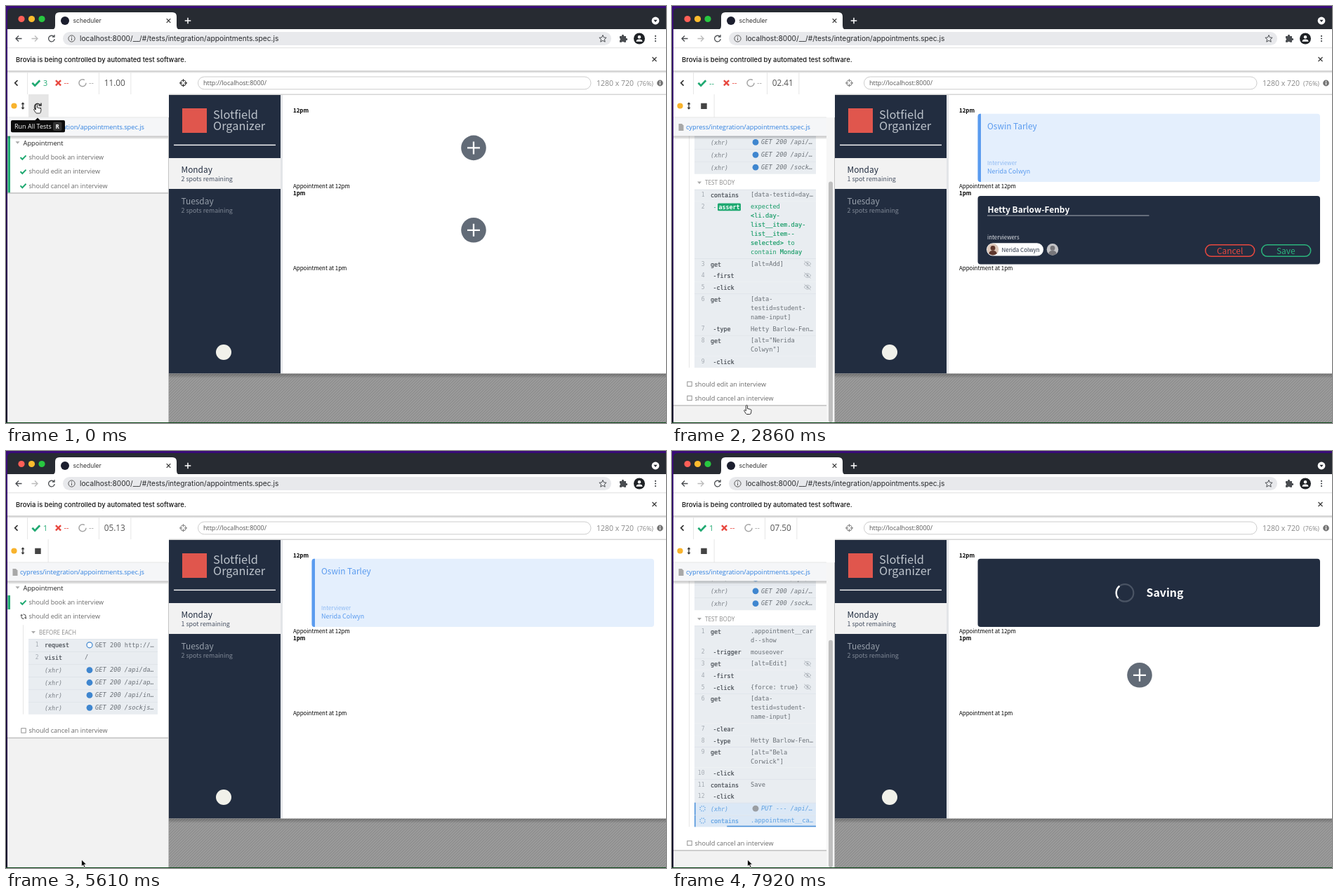
Write an HTML page that moves like this. It is 940 px wide and 595 px high and loops after 8 s.

```html
<!DOCTYPE html>
<html lang="en">
<head>
<meta charset="utf-8">
<title>scheduler</title>
<style>
html, body { margin: 0; width: 100%; height: 100%; overflow: hidden; background: #fff; }
svg { display: block; position: absolute; left: 0; top: 0; }
text { white-space: pre; }
.ui { font-family: "Open Sans", "Noto Sans", sans-serif; }
.sys { font-family: Inter, Roboto, sans-serif; }
.mono { font-family: "DejaVu Sans Mono", "Liberation Mono", monospace; }
.app { font-family: "Noto Sans CJK JP", "Noto Sans CJK SC", "Open Sans", sans-serif; }
</style>
</head>
<body>
<svg id="stage" width="940" height="595" viewBox="0 0 940 595"></svg>
<script>
const LOOP = 8000, STEP = 110;
const RESET = 440, SECOND = 4620;
const NAVY = '#222d40', BLUE = '#4a90d9', GREEN = '#1fa971', RED = '#e8483f';
const STUDENT = 'Oswin Tarley', NEWCOMER = 'Hetty Barlow-Fenby';
const MENTORS = ['Nerida Colwyn', 'Bela Corwick'];

// ---- drawing helpers
const esc = s => s.replace(/&/g, '&amp;').replace(/</g, '&lt;');
const text = (x, y, s, size, fill, cls = 'ui', more = '') =>
  `<text class="${cls}" x="${x}" y="${y}" font-size="${size}" fill="${fill}" ${more}>${esc(s)}</text>`;
const rect = (x, y, x2, y2, fill, more = '') =>
  `<rect x="${x}" y="${y}" width="${x2 - x}" height="${y2 - y}" fill="${fill}" ${more}/>`;
const disc = (x, y, r, fill, more = '') => `<circle cx="${x}" cy="${y}" r="${r}" fill="${fill}" ${more}/>`;
const line = (d, stroke, w = 1, more = '') =>
  `<path d="${d}" fill="none" stroke="${stroke}" stroke-width="${w}" ${more}/>`;
const shape = (d, fill, more = '') => `<path d="${d}" fill="${fill}" ${more}/>`;
const cross = (x, y, r, c, w) => line(`M${x - r} ${y - r}l${2 * r} ${2 * r}m0 ${-2 * r}l${-2 * r} ${2 * r}`, c, w);
const plus = (x, y, r, c, w) => line(`M${x - r} ${y}h${2 * r}M${x} ${y - r}v${2 * r}`, c, w);
const tick = (x, y, k, c) => line(`M${x - 4 * k} ${y}l${2.8 * k} ${2.8 * k}l${5.2 * k} ${-5.4 * k}`, c, 2 * k);
const spin = (x, y, a, body) => `<g transform="translate(${x} ${y}) rotate(${a})">${body}</g>`;
const dots = (x, y, r, c, t) => spin(x, y, t * .36,
  disc(0, 0, r, 'none', `stroke="${c}" stroke-width="1.5" pathLength="16" stroke-dasharray=".8 1.2"`));
const caret = (x, y) => shape(`M${x - 3} ${y - 1.8}h6l-3 3.6z`, '#aaa');

const defs = `<defs>
<linearGradient id="sky" x2="0" y2="1"><stop stop-color="#390b78"/><stop offset=".5" stop-color="#2b0a55"/><stop offset="1" stop-color="#130a28"/></linearGradient>
<linearGradient id="fade" x2="0" y2="1"><stop stop-color="#000" stop-opacity=".25"/><stop offset="1" stop-color="#000" stop-opacity="0"/></linearGradient>
<pattern id="hatch" width="4" height="4" patternUnits="userSpaceOnUse"><rect width="4" height="4" fill="#9a9a9a"/><path d="M-1 1L1-1M0 4L4 0M3 5L5 3" stroke="#888" stroke-width="1"/></pattern>
</defs>`;

// ---- browser window
function browser() {
  const ink = '#4a4d51';
  let s = shape('M2 34V9q0-6 6-6H940V34z', '#272b32');
  s += ['#ff5f57', '#febc2e', '#28c840'].map((c, i) => disc(22 + i * 14.5, 18.5, 4.6, c)).join('');
  s += shape('M64 34q6 0 6-6V15q0-6 6-6H237q6 0 6 6V28q0 6 6 6z', '#fff');
  s += disc(84, 21, 6, '#1b1e2e') + text(95.5, 24.2, 'scheduler', 8.6, '#333', 'sys');
  s += cross(231.5, 21, 2.8, '#333', 1.2) + plus(259, 21, 4.3, '#fff', 1.5);
  s += disc(925, 21, 5.4, '#fff') + shape('M922.4 19.8h5.2l-2.6 3.2z', '#272b32');
  s += rect(2, 33, 940, 94, '#fff');
  s += line('M22.5 46.5h-8.5m4-4l-4 4l4 4', ink, 1.3) + line('M36.5 46.5h8.5m-4-4l4 4l-4 4', '#bbb', 1.3);
  s += line('M68 43.5a4.3 4.3 0 1 0 1.2 3.6M69 41v3.2h-3.2', ink, 1.3);
  s += rect(81, 37, 862, 56, '#e8e9ec', 'rx="9.5"');
  s += disc(93.5, 46.5, 4.6, 'none', 'stroke="#555" stroke-width="1"') + line('M93.5 45.8v3.2M93.5 43.6v1.2', '#555', 1);
  s += text(105, 50, 'localhost:8000/__/#/tests/integration/appointments.spec.js', 10.2, '#26282b', 'sys');
  s += shape('M850 41.5l1.5 3.4l3.6.3l-2.7 2.4l.8 3.6l-3.2-1.9l-3.2 1.9l.8-3.6l-2.7-2.4l3.6-.3z', 'none', `stroke="${ink}" stroke-width="1"`);
  s += shape('M874 43h3a1.6 1.6 0 1 1 3 0h3v3a1.6 1.6 0 1 1 0 3v2.8h-3a1.6 1.6 0 0 0-3 0h-3v-2.8a1.6 1.6 0 0 0 0-3z', ink);
  s += disc(902, 46.5, 8, '#1f2226') + disc(902, 44.3, 2.2, '#fff') + shape('M897.5 50.8q0-3.4 4.5-3.4t4.5 3.4z', '#fff');
  s += [-3.6, 0, 3.6].map(d => disc(925, 46.5 + d, 1.1, ink)).join('');
  s += rect(2, 59.3, 940, 60.2, '#dcdcdc');
  s += text(14, 79.6, 'Brovia is being controlled by automated test software.', 9.45, '#111', 'sys', 'font-weight="500"');
  return s + cross(923.5, 76, 3, '#333', 1.1);
}

// ---- command log data: n = name, m = message lines, nm = lines in the narrow panel
const hook = at => [
  { n: 'request', m: ['GET 200 http://localhost:8000/'], dot: 'ring' }, { n: 'visit', m: ['/'] },
  ...['/api/days', '/api/appointments', '/api/interviewers', '/sockjs-node'].map(p => ({ n: '(xhr)', m: ['GET 200 ' + p], dot: 'full', it: 1 }))
].map(r => ({ ...r, at, tall: 1 }));
const cmd = (at, n, m = '', opt = {}) => ({ at, n, m: m.split('|'), ...opt });
const finish = (at, done) => [
  cmd(at, '(xhr)', 'PUT --- /api/appointments/2', { dot: 'wait', it: 1, tall: 1, done }),
  cmd(at, 'contains', '.appointment__card--show', { done, bar: at })];
const INPUT = '[data-|testid=student-|name-input]';

const tests = [
  { name: 'should book an interview', from: RESET, to: SECOND, hook: hook(1430), body: [
    cmd(1650, 'contains', '[data-testid=day], Monday'),
    cmd(1650, '-assert', 'expected *<li.day-*|*list__item.day-*|*list__item--*|*selected>* to|contain *Monday*',
      { ok: 1, nm: 'expected|*<li.day-*|*list__item.day-*|*list__item--*|*selected>* to|contain *Monday*'.split('|') }),
    cmd(1760, 'get', '[alt=Add]', { eye: 1 }), cmd(1760, '-first', '', { eye: 1 }),
    cmd(1870, '-click', '', { eye: 2, done: 2050, bar: 1870 }),
    cmd(2090, 'get', INPUT), cmd(2150, '-type', NEWCOMER, { done: 2700, bar: 2150 }),
    cmd(2750, 'get', `[alt="${MENTORS[0].replace(' ', '|')}"]`), cmd(2750, '-click', '', { done: 2860, bar: 2750 }),
    cmd(2970, 'contains', 'Save'), cmd(2970, '-click', '', { done: 3080, bar: 2970 }),
    ...finish(3075, 4510)] },
  { name: 'should edit an interview', from: SECOND, to: LOOP, hook: hook(5500), body: [
    cmd(5720, 'get', '.appointment__card-|-show', { nm: ['.appointment__car', 'd--show'] }),
    cmd(5830, '-trigger', 'mouseover', { done: 6050, bar: 5900 }),
    cmd(5940, 'get', '[alt=Edit]', { eye: 1, done: 6050, bar: 5940 }),
    cmd(5940, '-first', '', { eye: 1, done: 6050, bar: 5940 }),
    cmd(5940, '-click', '{force: true}', { eye: 2, done: 6050, bar: 5940 }),
    cmd(6050, 'get', INPUT), cmd(6160, '-clear'), cmd(6160, '-type', NEWCOMER, { done: 6550, bar: 6160 }),
    cmd(6600, 'get', `[alt="${MENTORS[1].replace(' ', '|')}"]`), cmd(6600, '-click', '', { done: 6710, bar: 6600 }),
    cmd(6710, 'contains', 'Save'), cmd(6710, '-click', '', { done: 6820, bar: 6710 }),
    ...finish(6850, LOOP)] },
  { name: 'should cancel an interview', from: LOOP, to: LOOP }
];

const rowHeight = (r, narrow) => r.tall ? 17.9 : 13 * ((narrow && r.nm) || r.m).length + 3.7;
const medium = c => `stroke="${c}" stroke-width=".2"`;
const rich = (s, c) => s.split('*').map((p, i) => i % 2 ? `<tspan ${medium(c)}>${esc(p)}</tspan>` : esc(p)).join('');

function row(r, num, y, narrow, t) {
  const right = narrow ? 205 : 216, h = rowHeight(r, narrow), cy = y + (r.tall ? 9 : 8.4), base = cy + 3;
  const wait = t < (r.done || 0), child = r.n[0] === '-';
  const ink = wait ? '#5b9fe2' : r.ok ? '#1a9d69' : '#6a7077';
  let s = rect(32, y, right, y + h + .1, wait ? '#dbe8f6' : '#e9edf1');
  if (!child) s += rect(32, y, right, y + .8, '#dde2e8');
  if (wait) {
    s += rect(32, y, 33.5, y + h, BLUE) + dots(43.5, cy - .5, 3.6, '#5b9fe2', t);
    if (r.bar) s += rect(32 + (right - 32) * Math.max(0, t - r.bar) / 4000, y + h - 1.6, right, y + h, BLUE);
  } else if (num) s += text(46.5, base - 1, num, 8, '#a5abb2', 'mono', 'text-anchor="end"');
  const slant = r.it ? 'font-style="italic"' : '';
  const nameInk = wait ? '#5b9fe2' : r.it ? '#777d84' : '#434950';
  if (r.ok) {
    s += text(58.5, base, '-', 8.3, GREEN, 'mono') + rect(65, cy - 5.3, 98, cy + 5.3, GREEN, 'rx="1.5"');
    s += text(66.5, base - .2, 'assert', 8.3, '#fff', 'mono', 'font-weight="700"');
  } else s += text(child ? 58.5 : 55, base, r.n, 8.3, nameInk, 'mono', r.it ? slant : medium(nameInk));
  if (r.dot === 'ring') s += disc(119, cy - .5, 4, '#fff', 'stroke="#3f86cf" stroke-width="1.2"');
  else if (r.dot) s += disc(119, cy - .5, 4.4, wait ? '#9a9ea3' : '#3f86cf');
  const max = (narrow ? 17 : 19) - (r.dot ? 3 : 0);
  ((narrow && r.nm) || r.m).forEach((m, i) => {
    const cut = !m.includes('*') && m.length > max ? m.slice(0, max - 1) + '…' : m;
    s += text(r.dot ? 127 : 112, base - .8 + i * 13, '', 8.7, ink, 'mono', slant).replace('</text>', rich(cut, ink) + '</text>');
  });
  if (r.eye && (r.eye > 1 || !wait)) {
    const x = right - 12, e = cy - .8;
    s += line(`M${x - 5} ${e}q5-6 10 0q-5 6-10 0M${x - 4.5} ${e - 4}l9 8`, '#a9afb6', .8) + disc(x, e, 1.4, '#a9afb6');
  }
  return s;
}

// Lays the log out from y; returns its markup and its lower edge.
function log(narrow, y, t) {
  const done = t < RESET, top = y;
  let s = caret(16.5, y + 9.5) + text(24.5, y + 13, 'Appointment', 9.3, '#222');
  y += 30.5;
  for (const k of tests) {
    const passed = done || t >= k.to, live = !passed && t >= k.from;
    if (passed) s += tick(24.5, y, 1, GREEN) + (done ? '' : rect(2.5, y - 10, 6, y + 10, GREEN));
    else if (live) s += spin(25, y, t * .3, line('M-3-.9a3.2 3.2 0 0 1 5.7-.9M3 .9a3.2 3.2 0 0 1-5.7.9', '#555', 1.1) + shape('M4-3.600v3h-3zM-4 3.600v-3h3z', '#555'));
    else s += rect(21.8, y - 3.2, 28.2, y + 3.2, '#fff', 'stroke="#888" stroke-width=".9"');
    s += text(32.5, y + 3.2, k.name, 9.1, '#6a6a6a');
    if (live && t >= k.hook[0].at) {
      const from = y + 12;
      y += 22.5;
      for (const [title, rows] of [['BEFORE EACH', k.hook], ['TEST BODY', k.body]]) {
        const seen = rows.filter(r => t >= r.at);
        if (!seen.length) continue;
        s += caret(39, y) + text(47, y + 3, title, 8.2, '#8b8b8b');
        y += 9.6;
        let num = 0;
        for (const r of seen) {
          s += row(r, r.it ? '' : String(++num), y, narrow, t);
          y += rowHeight(r, narrow);
        }
        y += 12.6;
      }
      y -= 12.6;
      s += rect(24, from, 24.7, y, '#dcdcdc');
      y += 23.2;
    } else y += 20.2;
  }
  const end = y - 9.7;
  if (done) s += rect(2.5, top, 6, end, GREEN);
  return { s, end };
}

function panel(t) {
  const top = 185.5, limit = 570;
  const narrow = log(false, top, t).end > limit;
  let l = log(narrow, top, t);
  const scroll = Math.max(0, l.end - limit);
  if (scroll) l = log(narrow, top - scroll, t);
  const right = narrow ? 220 : 231;
  let s = rect(2, 126, 232, 594, '#f2f2f2') + rect(2, 159, right, l.end, '#fff') + l.s;
  s += rect(2, l.end - .7, right, l.end + .7, '#bdbdbd');
  if (narrow) {
    s += rect(220, 159, 231, 594, '#f6f6f6');
    s += rect(223, 595 - 436 * 436 / (436 + scroll), 229, 594, '#bfbfbf', 'rx="3"');
  }
  s += rect(231, 159, 232, 594, '#c4c4c4');
  s += rect(2, 94, 232, 159, '#fff') + rect(2, 159, right, top, '#f5f6f8') + rect(2, 158.5, right, 159.3, '#e2e2e2');
  s += rect(2, top, right, top + 5, 'url(#fade)');
  s += shape('M9.5 168h4.5l2.5 2.5v7.5h-7z', '#a8a8a8');
  s += text(20, 175.8, 'cypress/integration/appointments.spec.js', 9.2, '#2f80e0');
  return { s, hand: l.end > 569 };
}

// ---- runner header
const marks = [[440, 0], [1210, .73], [1870, 1.4], [3740, 3.3], [4730, 4.3], [5940, 5.44], [7920, 7.5]];
function clock(t) {
  if (t < RESET) return '11.00';
  const next = marks.findIndex(m => t < m[0]), i = next < 0 ? marks.length - 1 : next;
  const [a, u] = marks[i - 1], [b, v] = marks[i];
  return (u + (v - u) * (t - a) / (b - a)).toFixed(2).padStart(5, '0');
}

function header(t, loading) {
  const idle = t < RESET, count = idle ? '3' : t >= SECOND ? '1' : '--', d = count === '--' ? 3 : 0;
  const rule = (x, y, y2) => rect(x, y, x + .8, y2, '#e0e0e0');
  let s = rect(2, 93, 940, 126, '#fff') + rect(2, 92.3, 940, 96, 'url(#fade)') + rect(232, 125.5, 940, 127, '#d5d5d5');
  s += line('M16.5 106l-3.8 3.8l3.8 3.8', '#333', 1.7) + tick(42.8, 109.8, 1.35, GREEN);
  s += text(53, 113.6, count, 10.8, GREEN) + cross(74.5 + d, 109.8, 3.6, RED, 2.4) + text(82.5 + d, 113.4, '--', 10.8, RED);
  s += disc(109 + d, 109.8, 5, 'none', 'stroke="#a5a5a5" stroke-width="1.5" stroke-dasharray="26 5.4"') + text(118 + d, 113.4, '--', 10.8, '#a5a5a5');
  s += text(139.7 + d, 114, clock(t), 11.8, '#555');
  s += rule(30, 95, 126) + rule(132 + d, 95, 126) + rule(177.5 + d, 95, 126);
  const c = idle ? '#333' : '#888';
  s += disc(252.5, 109.8, 3.8, 'none', `stroke="${c}" stroke-width="1.2"`) + line('M247 109.8h4m3 0h4M252.5 104.3v4m0 3v4', c, 1.2);
  s += rect(273.5, 101, loading ? 837 : 833, 118.8, '#fff', 'rx="8.9" stroke="#cdcdcd" stroke-width="1"');
  if (loading) {
    s += shape('M778.5 101H828a8.9 8.9 0 0 1 0 17.8H778.5z', '#eee', 'stroke="#cdcdcd" stroke-width="1"');
    s += text(782, 113, '...loading', 8.3, '#666') + dots(826, 109.8, 4.3, '#555', t);
  }
  s += text(281, 113, 'http://localhost:8000/', 8.96, '#555');
  s += text(841, 113.6, '1280 x 720', 10.5, '#888') + text(899, 113.5, '(76%)', 9, '#888');
  s += disc(931.5, 110, 4.4, '#777') + line('M931.5 109.3v3.2M931.5 107v1.4', '#fff', 1.2);
  s += disc(11.5, 142.5, 4.1, '#f8b32d') + line('M24 138.5v8', '#333', 1.3) + shape('M21.5 140.3l2.5-3.1l2.5 3.1zM21.5 144.7l2.5 3.1l2.5-3.1z', '#333');
  if (idle) s += rect(32, 126, 60, 159, '#e6e6e6') + line('M49 141.5a4.6 4.6 0 1 0 .6 3.5M50 138.5v3.6h-3.6', '#333', 1.5);
  else s += rect(41.2, 138.7, 49.7, 147, '#444');
  s += rule(59.7, 126, 159);
  if (idle) {
    s += shape('M41 163.5l4-4l4 4z', '#0c0c0c') + rect(7, 163, 84, 180.3, '#0c0c0c', 'rx="2"');
    s += text(12, 174.8, 'Run All Tests', 9, '#fff') + rect(67, 165.5, 79.5, 178, '#333', 'rx="2"');
    s += text(70.5, 174.9, 'R', 8, '#fff', 'ui', 'font-weight="700"');
  }
  return s;
}

// ---- application under test
const app = (x, y, s, size, fill, weight = 400) => text(x, y, s, size, fill, 'app', `font-weight="${weight}"`);
const box = (y, fill) => rect(435.5, y, 923, y + 97.3, fill, 'rx="4"');
const addButton = y => disc(666, y + 48.7, 17.8, '#626b77') + plus(666, y + 48.7, 9, '#fff', 2.3);

function card(y, who, mentor) {
  return box(y, '#e4effd') + shape(`M440 ${y}v97.3h-1q-3.500 0-3.500-4V${y + 4}q0-4 3.500-4z`, '#5a9bef')
    + app(449, y + 22.5, who, 11.9, '#5a9bef') + app(449, y + 73.5, 'Interviewer', 7.9, '#8db9f3') + app(449, y + 84.9, mentor, 9, '#5a9bef');
}

function saving(y, age) {
  return box(y, NAVY) + disc(645, y + 48.7, 12.3, 'none', 'stroke="#4a5464" stroke-width="2.2"')
    + spin(645, y + 48.7, 135 + age / 1100 * 360, line('M12.3 0A12.3 12.3 0 0 1 0 12.3', '#fff', 2.4))
    + app(675.5, y + 54.5, 'Saving', 15.9, '#fff', 600);
}

function avatar(x, y, i) {
  const [bg, fg] = [['#dcc6b8', '#5f382e'], ['#c3c3c6', '#77767a']][i];
  return disc(x, y, 8.3, bg) + disc(x, y - 2, 3.4, fg) + shape(`M${x - 5.8} ${y + 5.9}q.8-4.4 5.8-4.4t5.8 4.4q-5.8 4.4-11.6 0z`, fg);
}

function form(y, who, pick) {
  let s = box(y, NAVY) + app(449.5, y + 23.5, who, 11.9, '#fff', 600) + rect(449, y + 27.4, 679.5, y + 28.4, '#a8adb6');
  s += app(449, y + 61.4, 'interviewers', 7.9, '#dfe2e7');
  let x = 448;
  MENTORS.forEach((m, i) => {
    if (i === pick) s += rect(x, y + 67.2, x + 81, y + 85.5, '#fff', 'rx="9.1"') + app(x + 21.5, y + 79.4, m, 7.95, NAVY);
    s += avatar(x + (i && pick === 0 ? 10 : 9), y + 76.3, i);
    x += i === pick ? 84 : 22;
  });
  const button = (x, tx, label, c) => rect(x, y + 69.7, x + 70, y + 86.2, 'none', `rx="8.2" stroke="${c}" stroke-width="1.5"`) + app(tx, y + 82.4, label, 11.9, c);
  return s + button(759.7, 776, 'Cancel', RED) + button(839.7, 861, 'Save', '#2bb47c');
}

const typed = (t, from, to) => NEWCOMER.slice(0, Math.max(0, Math.round((t - from) / (to - from) * NEWCOMER.length)));

function slots(t) {
  const A = 153.7, B = 271.1, old = () => card(A, STUDENT, MENTORS[0]);
  if (t < RESET) return addButton(A) + addButton(B);
  if (t < 1980) return old();
  if (t < 3040) return old() + form(B, typed(t, 2150, 2700), t < 2800 ? -1 : 0);
  if (t < 4510) return old() + saving(B, t - 3040);
  if (t < SECOND) return old() + card(B, NEWCOMER, MENTORS[0]);
  if (t < 5900) return old();
  const add = t >= 6160 ? addButton(B) : '';
  if (t < 6800) return add + form(A, t < 6160 ? STUDENT : typed(t, 6160, 6550), t < 6650 ? 0 : 1);
  return add + saving(A, t - 6800);
}

function page(t, stage) {
  let s = rect(232, 126, 940, 525, '#fff');
  if (stage > 0) {
    s += rect(391, 127, 394, 524.5, '#e3e5e8') + rect(232, 127, 391, 524.5, NAVY);
    const y = stage > 1 ? 197.7 : 160.8;
    s += rect(239, y, 384, y + 1.4, '#fff');
  }
  if (stage > 1) {
    s += rect(251, 146, 286, 181, '#e0564d') + app(295, 161, 'Slotfield', 16.4, '#bcc3cb', 200) + app(295, 177, 'Organizer', 16.4, '#bcc3cb', 200);
    s += rect(232, 217, 391, 261, '#f2f2f2') + app(249.5, 238, 'Monday', 11.9, NAVY);
    s += app(249.5, 250, t < RESET ? '2 spots remaining' : '1 spot remaining', 8.9, '#465062', 300);
    s += app(249.5, 282.6, 'Tuesday', 11.9, '#98a0ab') + app(249.5, 295, '2 spots remaining', 8.9, '#808996', 300);
    s += disc(310, 494, 11, '#f1f1ea');
    s += app(409, 152, '12pm', 7.9, '#000', 700) + app(409, 259.5, 'Appointment at 12pm', 7.92, '#000');
    s += app(409, 269.8, '1pm', 7.9, '#000', 700) + app(409, 377, 'Appointment at 1pm', 7.92, '#000') + slots(t);
  }
  return s + rect(232, 524.5, 940, 594, 'url(#hatch)') + rect(232, 524.5, 940, 531, 'url(#fade)');
}

// ---- pointer
const ease = (t, a, b) => { const p = Math.min(1, Math.max(0, (t - a) / (b - a))); return p * p * (3 - 2 * p); };
function pointer(t, overTest) {
  const go = ease(t, 500, 1150), x = 44.5 + 63 * go, y = 140 + 429.5 * go + 13.5 * ease(t, 4070, 4400);
  const hand = go < .02 || (overTest && y < 571);
  const d = hand ? 'M-2.2 1.2a1.1 1.1 0 0 1 2.2 0v3.8l4 .9q1.7.4 1.5 2l-.6 3.6q-.3 1.5-1.8 1.5h-3.8q-1 0-1.6-1l-2.7-4.3q.6-1.5 2-.3l.8.8z'
    : 'M0 0v9.8l2.3-2.1l1.6 3.7l1.7-.7l-1.6-3.6h3.1z';
  return `<path transform="translate(${x} ${y})" d="${d}" fill="${hand ? '#fff' : '#000'}" stroke="${hand ? '#000' : '#fff'}" stroke-width=".8" stroke-linejoin="round"/>`;
}

function scene(t) {
  const blank = (t >= RESET && t < 1100) || (t >= SECOND && t < 5170);
  const bare = (t >= 1100 && t < 1430) || (t >= 5170 && t < 5500);
  const side = panel(t);
  return defs + rect(0, 0, 940, 595, 'url(#sky)') + page(t, blank ? 0 : bare ? 1 : 2) + side.s + browser()
    + header(t, (blank || bare) && t >= 550) + rect(0, 594, 940, 595, '#0f4a1c') + pointer(t, side.hand);
}

const stage = document.getElementById('stage'), begin = performance.now();
let shown = -1;
function update() {
  const step = Math.floor((performance.now() - begin) % LOOP / STEP);
  if (step !== shown) stage.innerHTML = scene((shown = step) * STEP);
  requestAnimationFrame(update);
}
update();
</script>
</body>
</html>
```
